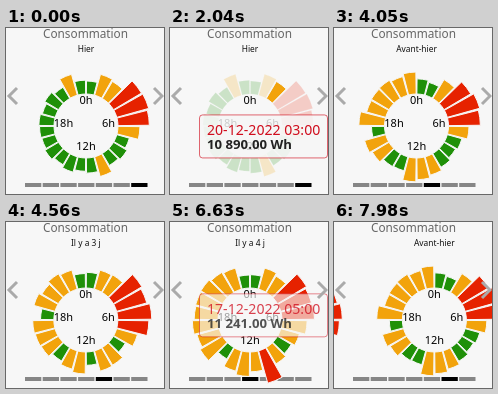
An HTML page with a canvas for the animation above (8 s loop, 158 by 166 pixels).

```html
<!DOCTYPE html>
<html lang="fr">
<head>
<meta charset="utf-8">
<title>Consommation</title>
<style>
html, body { margin: 0; width: 100%; height: 100%; overflow: hidden; background: #f7f7f7; }
canvas { display: block; width: 158px; height: 166px; }
</style>
</head>
<body>
<canvas id="stage"></canvas>
<script>
const LOOP = 8000, W = 158, H = 166, CX = 80, CY = 98, INNER = 32, STEP = Math.PI / 12;
const BG = '#f7f7f7', FONT = '"Noto Sans", "Open Sans", sans-serif';

const canvas = document.getElementById('stage');
const ctx = canvas.getContext('2d');
const dpr = window.devicePixelRatio || 1;
canvas.width = W * dpr;
canvas.height = H * dpr;

// Consumption levels: low, medium, high, peak
const levels = {
  l: { radius: 46.5, wh: 1850, color: '#1f9008', ink: '#1f9008' },
  m: { radius: 52.5, wh: 4203, color: '#f2a30c', ink: '#f2a30c' },
  h: { radius: 56.5, wh: 5920, color: '#f2a30c', ink: '#f2a30c' },
  p: { radius: 64.5, color: '#e62200', ink: '#d00d1d' }
};

// One letter per hour
const days = [
  { name: 'Hier', date: '20-12-2022', peak: 10890, hours: 'lmmpppmlllmlllllllllllml' },
  { name: 'Avant-hier', date: '19-12-2022', peak: 10640, hours: 'llmpppmlllmmhllmmlhmmmmm' },
  { name: 'Il y a 3 j', date: '18-12-2022', peak: 10750, hours: 'lmmppppmlmmlmmlmmmlmmmml' },
  { name: 'Il y a 4 j', date: '17-12-2022', peak: 11241, hours: 'lmmppphmlmpmhmlhhhhhhhml' }
];
days.forEach((day, n) => {
  day.bars = [...day.hours].map((key, hour) => {
    const level = levels[key], swell = Math.sin((hour - 3 - n * 2 / 3) * Math.PI * 6 / 7);
    return { ...level, radius: level.radius + 1.5 * swell, wh: (level.wh || day.peak) + 300 * swell };
  });
});

// Slide changes: start, from day, to day
const slides = [[3150, 0, 1], [4035, 1, 2], [5460, 2, 3], [6640, 3, 2], [7662, 2, 1]];
const SLIDE_MS = 550;

// The pointer sweeps over the hours, clockwise at an even pace.
const visits = [
  { day: 0, start: 1320, pace: 101, from: 20, to: 34, leave: 2860 },
  { day: 3, start: 6010, pace: 42, from: 19, to: 29, leave: 6475 }
];

const clamp = (v, lo, hi) => Math.min(hi, Math.max(lo, v));
const ramp = (t, start, length) => clamp((t - start) / length, 0, 1);

// Standard CSS "ease" curve
function ease(x) {
  if (x <= 0 || x >= 1) return clamp(x, 0, 1);
  let lo = 0, hi = 1;
  for (let i = 0; i < 20; i++) {
    const s = (lo + hi) / 2, u = 1 - s;
    if (.75 * u * u * s + .75 * u * s * s + s ** 3 < x) lo = s; else hi = s;
  }
  return .3 * (1 - lo) ** 2 * lo + 3 * (1 - lo) * lo * lo + lo ** 3;
}

function text(s, x, y, size, color, align = 'center', weight = 400) {
  ctx.font = `${weight} ${size}px ${FONT}`;
  ctx.fillStyle = color;
  ctx.textAlign = align;
  ctx.fillText(s, x, y);
}

function hourAt(visit, t) {
  const hour = visit.from + Math.floor((t - visit.start) / visit.pace);
  return clamp(hour, visit.from, visit.to) % 24;
}

function drawChart(day, visit, t) {
  const dim = visit ? ramp(t, visit.start, 100) * (1 - ramp(t, visit.leave, 110)) : 0;
  const active = visit ? hourAt(visit, t - 40) : -1;
  day.bars.forEach(({ radius, color }, hour) => {
    const a = hour * STEP - Math.PI / 2, gap = .012;
    ctx.globalAlpha = hour === active ? 1 : 1 - .8 * dim;
    ctx.beginPath();
    ctx.arc(CX, CY, radius, a + gap, a + STEP - gap);
    ctx.arc(CX, CY, INNER, a + STEP - gap, a + gap, true);
    ctx.closePath();
    ctx.fillStyle = color;
    ctx.fill();
    ctx.strokeStyle = BG;
    ctx.lineWidth = 1;
    ctx.stroke();
  });
  ctx.globalAlpha = 1;
  text('0h', 80, 76, 11, '#000');
  text('6h', 102.5, 99, 11, '#000');
  text('12h', 80, 122, 11, '#000');
  text('18h', 57.5, 99, 11, '#000');
  text(day.name, 80, 24, 8.4, '#111');
}

// Above the bar's tip where it fits, otherwise below it
function tooltipPlace(visit, t) {
  const hour = hourAt(visit, t), angle = (hour + .5) * STEP;
  const { radius } = days[visit.day].bars[hour];
  const tipX = CX + radius * Math.sin(angle), tipY = CY - radius * Math.cos(angle);
  const above = tipY - 61;
  return [clamp(tipX - 65, 1.5, 29.5), above < 25 ? tipY + 31 : above];
}

function drawTooltip(visit, t) {
  const alpha = ramp(t, visit.start - 30, 100) * (1 - ramp(t, visit.leave + 90, 300));
  if (alpha <= 0) return;
  const day = days[visit.day], hour = hourAt(visit, t), { wh, ink } = day.bars[hour];

  // The box trails its target by averaging recent positions.
  const now = Math.min(t, visit.leave), samples = 14;
  let x = 0, y = 0;
  for (let i = 0; i < samples; i++) {
    const [px, py] = tooltipPlace(visit, now - i * 10);
    x += px / samples;
    y += py / samples;
  }
  ctx.globalAlpha = alpha;
  ctx.beginPath();
  ctx.roundRect(x, y, 128, 43, 3);
  ctx.fillStyle = 'rgba(247,247,247,.82)';
  ctx.fill();
  ctx.strokeStyle = ink + 'a0';
  ctx.lineWidth = 1;
  ctx.stroke();

  const amount = String(Math.round(wh)).replace(/\B(?=(\d{3})+$)/g, ' ') + '.00 Wh';
  text(`${day.date} ${String(hour).padStart(2, '0')}:00`, x + 7.5, y + 20.5, 14.1, ink, 'left');
  text(amount, x + 7.5, y + 34.5, 13.2, '#222', 'left', 700);
  ctx.globalAlpha = 1;
}

function chevron(x, dir) {
  ctx.beginPath();
  ctx.moveTo(x + 4 * dir, 60);
  ctx.lineTo(x - 4 * dir, 68);
  ctx.lineTo(x + 4 * dir, 76);
  ctx.strokeStyle = '#aaa';
  ctx.lineWidth = 3;
  ctx.stroke();
}

function draw(t) {
  ctx.setTransform(dpr, 0, 0, dpr, 0, 0);
  ctx.fillStyle = BG;
  ctx.fillRect(0, 0, W, H);

  let pos = 0, current = 0;
  for (const [start, from, to] of slides) {
    if (t < start) break;
    pos = from + (to - from) * ease((t - start) / SLIDE_MS);
    current = to;
  }

  for (let i = 0; i < 7; i++) {
    ctx.fillStyle = i === 6 - current ? '#000' : '#868686';
    ctx.fillRect(19 + 17.7 * i, 155, 16.3, 4);
  }

  days.forEach((day, i) => {
    const x = (pos - i) * W;
    if (Math.abs(x) >= W + 10) return;
    const visit = visits.find(v => v.day === i && t >= v.start);
    ctx.save();
    ctx.translate(x, 0);
    drawChart(day, visit, t);
    if (visit) drawTooltip(visit, t);
    ctx.restore();
  });

  chevron(7, 1);
  chevron(152, -1);
  text('Consommation', 79.5, 10, 11.8, '#666');
}

function tick() {
  draw(performance.now() % LOOP);
  requestAnimationFrame(tick);
}
tick();
</script>
</body>
</html>
```
